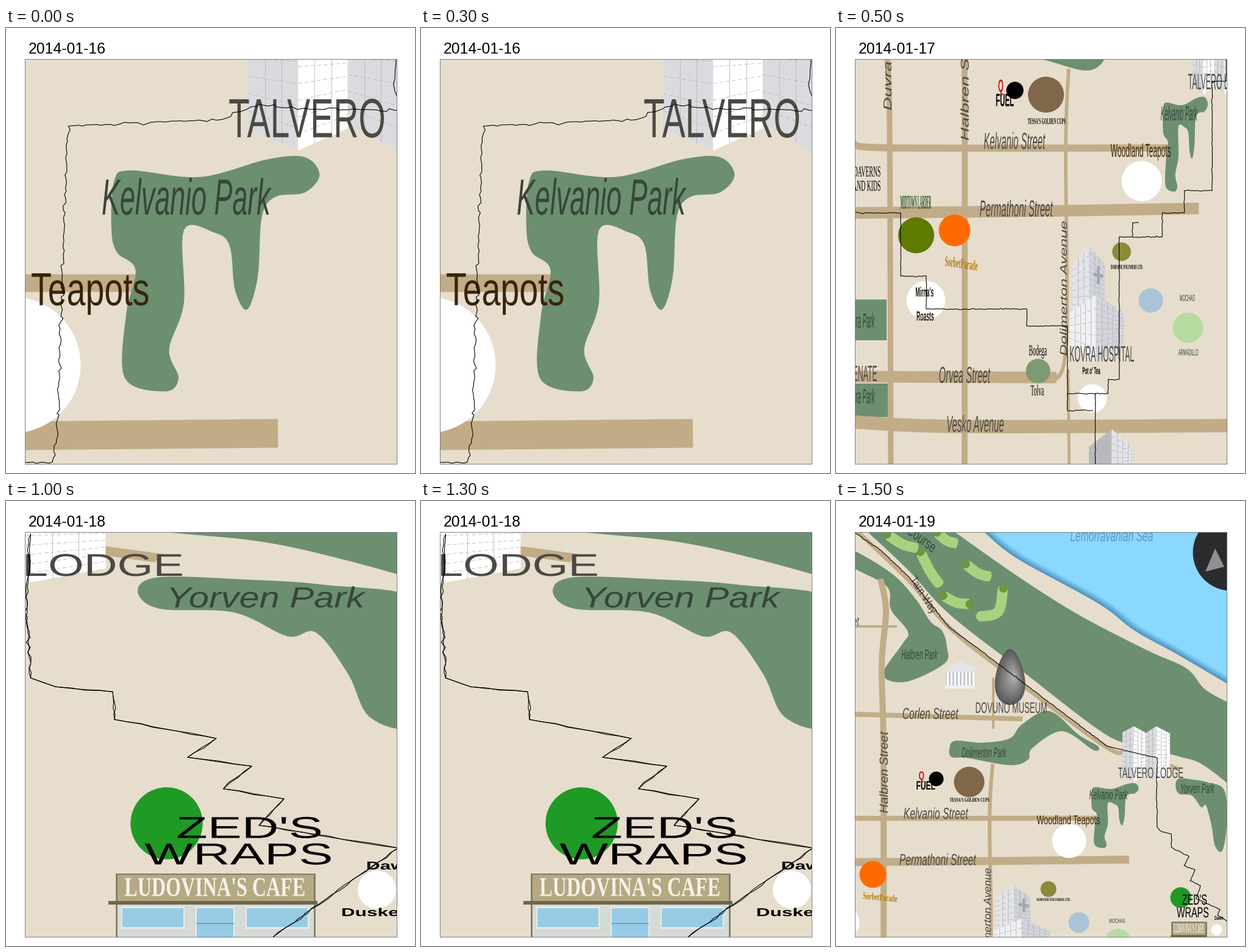
Animation, 671 px wide and 731 px high, one loop 2000 ms. Source, as a matplotlib script:

```python
import numpy as np
import matplotlib.pyplot as plt
from matplotlib.animation import FuncAnimation
from matplotlib.patches import PathPatch, Polygon
from matplotlib.textpath import TextPath
from matplotlib.transforms import Affine2D

W, H, DPI = 671, 731, 64
PT = 72 / DPI
LEFT, RIGHT, TOP, BOTTOM = 30.5, 640.5, 51, 716
LAND, PARK, ROAD, INK = "#e6ddcd", "#6c8f70", "#c1ac87", "#4c4944"
WHITE, GREY, SHADE, COCOA = "#ffffff", "#dadbdf", "#37463a", "#3a2408"
SQUEEZE = 0.75  # lettering is narrowed across the map

# Family, style, weight, width and usual size of each lettering.
FACES = {
    "street": ("Liberation Sans", "italic", "normal", 0.8, 26),
    "park": ("Liberation Sans", "italic", "normal", 0.59, 23),
    "place": ("Liberation Sans", "normal", "normal", 0.69, 25),
    "shop": ("Liberation Sans", "normal", "normal", 0.8, 24),
    "bold": ("Liberation Sans", "normal", "bold", 0.8, 15),
    "serif": ("Liberation Serif", "normal", "normal", 0.8, 17),
    "heavy": ("Liberation Serif", "normal", "bold", 0.8, 16),
    "sign": ("Liberation Serif", "normal", "bold", 0.34, 21.5),
}
# Date and visible part of the map (left, right, top, bottom).
DAYS = (
    ("2014-01-16", 386.7, 525.1, 419.6, 602.8),
    ("2014-01-17", -111.3, 528.5, 421.1, 876),
    ("2014-01-18", 525.3, 629.5, 420.2, 741.5),
    ("2014-01-19", 30.5, 640.5, 51, 716),
)

fig = plt.figure(figsize=(W / DPI, H / DPI), dpi=DPI, facecolor="white")
ax = fig.add_axes([LEFT / W, 1 - BOTTOM / H, (RIGHT - LEFT) / W, (BOTTOM - TOP) / H])
ax.set(xticks=[], yticks=[], facecolor=LAND)
ax.autoscale(False)
for spine in ax.spines.values():
    spine.set(color="#7f7f7f", linewidth=PT)
title = fig.text(37 / W, 1 - 42 / H, "", family="Liberation Sans", size=24.8 * PT)
dots = []


def smooth(pts, closed=False, n=8):
    """Catmull-Rom curve through the points."""
    p = np.array(pts, float)
    p = np.vstack([p[-1:], p, p[:2]]) if closed else np.vstack([p[:1], p, p[-1:]])
    t = np.linspace(0, 1, n, endpoint=False)[:, None]
    parts = []
    for a, b, c, d in zip(p, p[1:], p[2:], p[3:]):
        parts.append(0.5 * (2 * b + (c - a) * t + (2 * a - 5 * b + 4 * c - d) * t**2
                            + (3 * b - a - 3 * c + d) * t**3))
    return np.vstack(parts + [p[-2:-1]])


def poly(pts, color):
    ax.add_patch(Polygon(pts, fc=color, lw=0))


def box(x0, y0, x1, y1, color):
    poly([(x0, y0), (x1, y0), (x1, y1), (x0, y1)], color)


def blob(pts, color=PARK):
    poly(smooth(pts, closed=True), color)


def line(pts, color, width=0.8, **kw):
    return ax.plot(*np.array(pts, float).T, color=color, lw=width * PT, zorder=1, **kw)[0]


def dot(x, y, r, color):
    """A circle that stays round in every view."""
    mark, = ax.plot(x, y, "o", color=color, mew=0, zorder=1)
    dots.append((mark, r))


def road(pts, width, color=ROAD, rounded=False):
    mid = smooth(pts)
    way = np.gradient(mid, axis=0)
    side = np.c_[-way[:, 1], way[:, 0]] / np.hypot(*way.T)[:, None] * width / 2
    if rounded:
        u = np.linspace(0, 1, len(mid))
        side *= np.minimum(1, 9 * np.minimum(u, 1 - u) + 0.3)[:, None]
    poly([*(mid + side), *(mid - side)[::-1]], color)


def label(s, x, y, face, color=INK, size=None, angle=0, anchor=0.5):
    family, style, weight, width, usual = FACES[face]
    prop = {"family": family, "style": style, "weight": weight}
    path = TextPath((0, 0), s, size=size or usual, prop=prop)
    place = (Affine2D().translate(-anchor * path.get_extents().x1, 0).scale(width, -1)
             .rotate_deg(-angle).scale(SQUEEZE, 1).translate(x, y))
    ax.add_patch(PathPatch(place.transform_path(path), fc=color, lw=0))


def facade(xa, ya, xb, yb, base_a, base_b, color, cols=3, pitch=7.5):
    """Wall between two upright edges, with a window grid."""
    poly([(xa, ya), (xb, yb), (xb, base_b), (xa, base_a)], color)
    for u in np.arange(1, cols) / cols:
        x = xa + u * (xb - xa)
        line([(x, ya + u * (yb - ya)), (x, base_a + u * (base_b - base_a))], "#b2b3b8")
    rows = max(2, round((base_a - ya) / pitch))
    for v in np.arange(1, rows) / rows:
        line([(xa, ya + v * (base_a - ya)), (xb, yb + v * (base_b - yb))], "#b2b3b8",
             dashes=(8, 5))


def block(x0, xm, x1, peak, drop, base, left, right, cols=3):
    """Corner building: two walls that meet at a front edge."""
    facade(x0, peak + drop, xm, peak, base - drop, base, left, cols)
    facade(xm, peak, x1, peak + drop, base, base - drop, right, cols)


def track(pts, seed, jitter=0.35, step=3):
    """Route through the points with positioning noise."""
    rng = np.random.default_rng(seed)
    out = [pts[0]]
    for a, b in zip(np.array(pts[:-1], float), np.array(pts[1:], float)):
        n = max(1, int(np.hypot(*(b - a)) / step))
        mid = a + (b - a) * (np.arange(1, n) / n)[:, None]
        out += [*(mid + rng.normal(0, jitter, mid.shape)), b]
    return line(out, "black", 1.1)


def stairs(*values):
    """Corners of a route that turns by x, then y, then x."""
    return [(values[i], values[i + 1]) if i % 2 == 0 else (values[i + 1], values[i])
            for i in range(len(values) - 1)]


def coast():
    shore = smooth([(243, 51), (298, 95), (430, 168), (490, 213), (560, 252), (645, 302)])
    deep, light = np.array([77, 147, 191]) / 255, np.array([138, 216, 255]) / 255
    for u in np.linspace(0, 1, 8):
        edge = shore + u * np.array([8, -8])
        poly([*edge, (660, 40), (251, 40)], tuple(deep + u * (light - deep)))
    dot(648, 84, 63, "#2b2b2d")
    poly([(606, 116), (622, 78), (637, 108)], "#8f9093")
    top = smooth([(195, 51), (300, 125), (400, 188), (510, 245), (575, 275), (605, 309),
                  (645, 332)])
    low = smooth([(645, 466), (616, 443), (592, 428), (564, 420), (500, 402), (440, 382),
                  (300, 275), (185, 185), (120, 115), (52, 51)])
    poly([*top, *low], PARK)
    holes = (((138, 83), (172, 140)), ((212, 103), (255, 125)), ((175, 155), (221, 169)),
             ((83, 54), (135, 78)), ((165, 51), (200, 70)))
    for a, b in holes:
        bend = (np.add(a, b) / 2 + (0, 5)).tolist()
        road([a, bend, b], 17, "#a9d27f", rounded=True)
        dot(*a, 7, "#6d9440")
    road([(274, 138), (266, 182), (230, 190)], 17, "#a9d27f", rounded=True)
    dot(274, 143, 7, "#6d9440")
    dot(219, 169, 7, "#6d9440")


def parks():
    blob([(20, 78), (90, 118), (130, 160), (155, 198), (174, 213), (182, 240), (178, 267),
          (115, 297), (77, 285), (108, 236), (118, 215), (90, 178), (83, 140), (20, 104)])
    blob([(186, 408), (195, 394), (240, 397), (285, 390), (305, 367), (350, 345),
          (398, 384), (430, 403), (422, 409), (371, 378), (322, 406), (315, 425),
          (285, 434), (215, 422), (190, 421)])
    blob([(557, 467), (563, 456), (588, 458), (609, 462), (637, 475), (641, 530),
          (634, 574), (622, 567), (616, 533), (607, 500), (599, 503), (584, 484),
          (563, 481)])
    box(-112, 691, -56, 737, PARK)
    box(-112, 786, -53, 823, PARK)


def boot_park():
    blob([(419, 496), (420, 475), (426, 470), (452, 473), (477, 465), (491, 464),
          (496.5, 472), (491, 480), (480, 482), (475, 491), (473.5, 518), (469.5, 533),
          (465, 524), (463, 504), (457, 498), (446, 497), (446, 530), (440.5, 551),
          (444, 564), (439, 570), (424, 564), (424.5, 535), (428, 515), (421, 507)])


def roads():
    road([(36, 51), (120, 131), (185, 207), (290, 290), (440, 402), (472, 412)], 7)
    road([(545, 434), (563, 441)], 7)
    road([(73, 128), (82, 180), (75, 270), (78, 420), (78, 880)], 10)
    road([(-55, 421), (-51, 500), (-49, 880)], 9.5)
    road([(257, 432), (252, 520), (252, 750), (219, 780)], 6)
    road([(256, 770), (258, 880)], 5)
    road([(258, 290), (258, 374)], 4)
    road([(20, 206), (100, 206)], 4)
    road([(20, 350), (306, 358)], 8)
    road([(-112, 517), (-40, 521), (429, 521)], 8)
    road([(-112, 594), (200, 592), (481, 589)], 13)
    road([(-112, 778), (236, 779)], 13)
    road([(-112, 829), (70, 834), (540, 833)], 15)


def buildings():
    block(470, 488.5, 507, 370, 10, 461, GREY, WHITE)
    block(507, 525.5, 548, 370, 12, 461, GREY, WHITE)
    block(263, 292, 319, 631, 20, 755, "#e3e4e9", "#d0d3d9")
    line([(308, 655), (308, 673)], "#a2a5ac", 4)
    line([(302, 663), (314, 665)], "#a2a5ac", 5)
    block(259, 304, 352, 686, 20, 762, "#f0f0f2", "#d3d5da", 5)
    block(292, 331, 369, 837, 20, 900, "#b9babd", "#e2e3e7", 4)

    # Columned hall
    poly([(179, 278), (204, 263), (228, 274), (228, 281), (179, 281)], "#e4e5e9")
    box(181, 281, 227, 304, "#c6c8cd")
    for x in np.linspace(183, 225, 8):
        box(x - 1.5, 281, x + 1.5, 304, WHITE)
    box(179, 303, 228, 308, "#f0f0f2")

    # Steel dome
    t = np.linspace(0, 2 * np.pi, 60)
    egg = np.c_[24 * np.cos(t) * (1 - 0.3 * np.sin(t)), -46 * np.sin(t)]
    for u in np.linspace(0, 1, 10):
        poly(egg * (1 - 0.85 * u) + (285.5 + 6 * u, 289), str(0.36 + 0.3 * u))

    # Corner cafe
    box(551, 713, 606.5, 760, "#d5dbd4")
    box(551, 691.5, 606.5, 714, "#b5a983")
    for x in (551, 606.5):
        line([(x, 691.5), (x, 760)], "#77715f", 2.5)
    line([(551, 691.5), (606.5, 691.5)], "#847b60", 2)
    box(548.8, 713, 607.3, 716, "#70664f")
    for x, w, y in ((552.8, 17, 734), (587.6, 17, 734), (573.6, 10.2, 760)):
        box(x - 0.4, 717.5, x + w + 0.4, y + 1, "#e6ebe8")
        box(x, 719, x + w, y, "#97cbe5")
    line([(573.6, 731), (583.8, 731)], "#5f97b3", 1.5)


def shop_marks():
    for x, y, r, color in (
            (164, 456, 12, "black"), (218, 461, 25, "#80664a"), (382, 558, 28, WHITE),
            (-6, 619, 25, "#5f7a00"), (60, 613, 22, "#ff6a00"), (11, 692, 27, WHITE),
            (204, 771, 17, "#7d9a72"), (348, 637, 13, "#8a8a3c"), (398, 692, 17, "#a9c4d6"),
            (462, 723, 21, "#b5dba0"), (297, 802, 20, WHITE), (565, 651, 17, "#1f9a24"),
            (624, 704, 9, WHITE)):
        dot(x, y, r, color)


def names():
    for s, x, y in (("Kelvanio", 164, 522), ("Permathoni", 167, 598), ("Corlen", 155, 358),
                    ("Orvea", 78, 785), ("Vesko", 96, 840)):
        label(s + (" Avenue" if s == "Vesko" else " Street"), x, y, "street")
    label("Halbren Street", 85, 513, "street", angle=90, anchor=0)
    label("Duvra Street", -48, 479, "street", angle=90, anchor=0)
    label("Dolimerton Avenue", 254, 679, "street", size=22.5, angle=90)
    label("Tarn Way", 140, 159, "street", size=22, angle=-50)
    label("Course", 137, 69, "street", SHADE, angle=-30)
    label("Lemorravanian Sea", 452, 66, "street", "#5a9cc0")
    label("et", 33, 204, "street", size=20)
    for s, x, y in (("Halbren", 137, 260), ("Dolimerton", 243, 421), ("Kelvanio", 447, 490),
                    ("Yorven", 593, 480), ("Duvra", -102, 723), ("Duvra", -102, 808)):
        label(s + " Park", x, y, "park", SHADE)
    for s, x, y in (("TALVERO LODGE", 516, 455), ("DOVUNO MUSEUM", 287, 348),
                    ("KOVRA HOSPITAL", 314, 761), ("SENATE", -98, 783)):
        label(s, x, y, "place")

    label("Q", 140, 458, "bold", "#c8141e", size=20)
    label("FUEL", 147, 474, "bold", "black", size=20)
    label("TESSA'S GOLDEN CUPS", 219, 494, "heavy", "black", size=9.5)
    label("Woodland Teapots", 381, 531, "shop", COCOA, size=21)
    label("DAVERNS", -67, 553, "serif", "black", anchor=1)
    label("AND KIDS", -67, 569, "serif", "black", anchor=1)
    label("MIDTOWN LARDER", -6, 589, "sign", "#1f4a1f")
    label("SorbetParade", 72, 656, "heavy", "#b87a10", angle=-4)
    label("Mirna's", 9, 688, "bold", "#1c120a")
    label("Roasts", 10, 715, "bold", "#1c120a")
    label("Bodega", 204, 754, "serif", "black")
    label("Tolva", 203, 799, "serif", "black")
    label("DORVANE POLYMERS LTD.", 357, 657, "heavy", "black", size=7)
    label("MOCHAS", 461, 693, "shop", "#33402c", size=10)
    label("ARMADILLO", 463, 754, "shop", "#33402c", size=10)
    label("Pot o' Tea", 296, 775, "bold", "black", size=11)
    label("ZED'S", 588, 663, "shop", "black")
    label("WRAPS", 585, 684, "shop", "black")
    label("LUDOVINA'S CAFE", 578.5, 709, "sign", "#f4f2ea")
    label("Dawn", 621, 688, "bold", "black", size=9, anchor=0)
    label("Duskers", 614, 725, "bold", "black", size=9, anchor=0)


def routes():
    """Tracks of each day."""
    lane = [(527, 422), (526, 480), (527, 536), (534, 543), (550, 547), (550.5, 569),
            (579, 584), (571, 599), (589, 606), (581, 624), (598, 632), (591, 653),
            (630, 671)]
    return (
        [track([(525, 419), (524, 431), (525.5, 437)], 1),
         track([(526, 443), (490, 442), (474, 440), (460, 447), (403, 450), (401, 505),
                (400, 549), (399, 590), (397, 602), (386, 602)], 2, step=1.7)],
        [track(stairs(-112, 594, -32, 665, 12, 702, 185, 721, 255, 797, 325, 781, 344,
                      621, 418, 594, 456, 569, 504, 446, 528, 421), 3),
         track(stairs(255, 797, 255, 816, 298), 4),
         track([(303, 797), (303, 880)], 5),
         track(stairs(367, 620, 367, 605, 377), 6)],
        [track([*lane, (595, 741.5)], seed, 0.3, 4) for seed in (7, 8)],
        [track([(30, 51), (75, 82), (120, 125), (185, 207), (230, 240), (445, 403), *lane,
                (626, 680), (641, 690)], 9)],
    )


for draw in (coast, parks, roads, boot_park, buildings, shop_marks, names):
    draw()
tracks = routes()


def update(i):
    date, x0, x1, y0, y1 = DAYS[i]
    title.set_text(date)
    ax.set(xlim=(x0, x1), ylim=(y1, y0))
    scale = np.sqrt((RIGHT - LEFT) * (BOTTOM - TOP) / ((x1 - x0) * (y1 - y0)))
    for mark, r in dots:
        mark.set_markersize(2 * r * scale * PT)
    for day, group in enumerate(tracks):
        for t in group:
            t.set_visible(day == i)
    return []


anim = FuncAnimation(fig, update, frames=len(DAYS), interval=500, repeat=True, repeat_delay=0)
plt.show()
```
